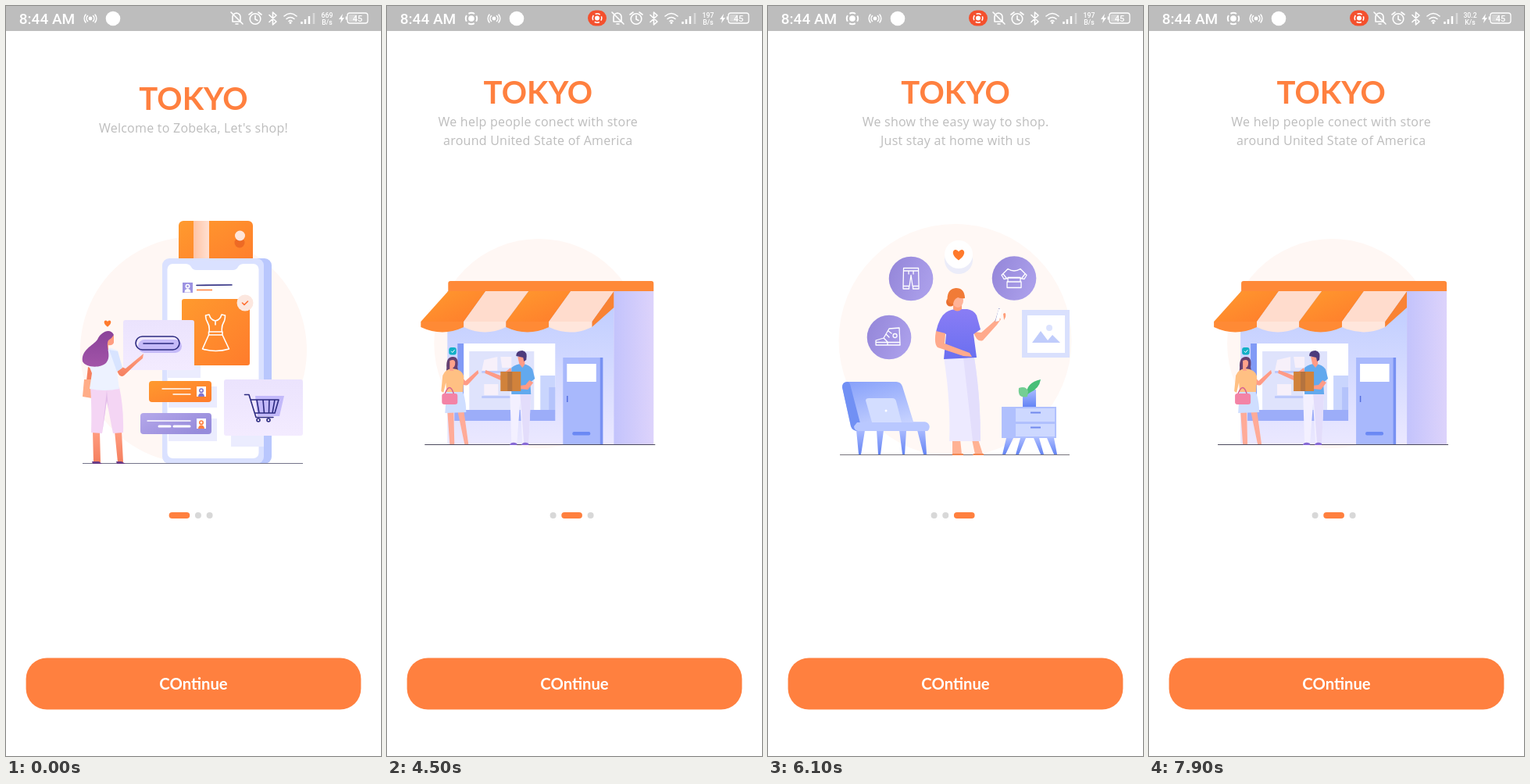
Animation of 480 by 960 pixels, one loop 8 s. Source, as an HTML page:

```html
<!DOCTYPE html>
<html lang="en">
<head>
<meta charset="utf-8">
<title>Shop onboarding</title>
<style>
  html, body { margin: 0; height: 100%; overflow: hidden; background: #fff; }
  svg { display: block; width: 100vw; height: 100vh; }
  text { font-family: "Open Sans", sans-serif; text-anchor: middle; }
  .title, .label { font-family: Lato, sans-serif; font-weight: 700; }
  .title { font-size: 40px; fill: #ff803f; }
  .label { font-size: 20.3px; fill: #fff; }
  .sub { font-size: 16px; letter-spacing: .25px; fill: #bdbdbd; }
  .bar text { font-family: Roboto, sans-serif; font-weight: 500; fill: #fff; }
  .speed text { font-size: 8.7px; }
  .line { fill: none; stroke: #fff; stroke-width: 1.6; stroke-linecap: round; stroke-linejoin: round; }
  .thin { stroke-width: 1.3; }
  .ink { stroke: #2d2b80; }
</style>
</head>
<body>
<svg viewBox="0 0 480 960" preserveAspectRatio="none">
  <defs>
    <linearGradient id="orange" x2="1" y2="1"><stop stop-color="#ff9a2e"/><stop offset="1" stop-color="#ff7c2c"/></linearGradient>
    <linearGradient id="purple" x2="1" y2=".6"><stop stop-color="#b5a8ea"/><stop offset="1" stop-color="#968bdb"/></linearGradient>
    <linearGradient id="badge" x2="1" y2=".4"><stop stop-color="#9385d8"/><stop offset="1" stop-color="#aa9eea"/></linearGradient>
    <linearGradient id="lilac" x2="0" y2="1"><stop stop-color="#ebe3fd"/><stop offset="1" stop-color="#f3ebff"/></linearGradient>
    <linearGradient id="blue" x2=".5" y2="1"><stop stop-color="#86a0fa"/><stop offset="1" stop-color="#c9d4ff"/></linearGradient>
    <linearGradient id="leg" x2="0" y2="1"><stop stop-color="#a9baff"/><stop offset="1" stop-color="#6484f4"/></linearGradient>
    <linearGradient id="wall" x2="0" y2="1"><stop stop-color="#bccbff"/><stop offset="1" stop-color="#ebe8ff"/></linearGradient>
    <linearGradient id="side" x2="1" y2="0"><stop stop-color="#c3c3fc"/><stop offset="1" stop-color="#ddd3fb"/></linearGradient>
    <linearGradient id="hair" x2="0" y2="1"><stop stop-color="#8a4399"/><stop offset="1" stop-color="#a254a8"/></linearGradient>
    <linearGradient id="skin" x2="0" y2="1"><stop stop-color="#ff9d80"/><stop offset="1" stop-color="#f5805f"/></linearGradient>
    <linearGradient id="top" x2="0" y2="1"><stop stop-color="#8a7df5"/><stop offset="1" stop-color="#6a6ff0"/></linearGradient>
    <linearGradient id="stripe" x2="1" y2="0"><stop stop-color="#ffc4a4"/><stop offset="1" stop-color="#ffe0d3"/></linearGradient>
    <clipPath id="view"><path d="M0 32H480V589H0z"/></clipPath>
    <g id="person"><circle cx="6" cy="4.2" r="2.2" fill="none" stroke-width="1.6"/><path d="M2 12a4 4.5 0 0 1 8 0z" stroke="none" fill="context-stroke"/></g>
    <path id="heart" d="M0 7C-11-1-7-7-3.500-6.500Q-1-6 0-4Q1-6 3.500-6.500C7-7 11-1 0 7z" fill="#ff7a2c"/>
    <g id="cast" class="line"><circle r="1.6" fill="#fff"/><path d="M-3.500-3.500a5 5 0 0 0 0 7M3.500-3.500a5 5 0 0 1 0 7M-6-5a8 8 0 0 0 0 10M6-5a8 8 0 0 1 0 10"/></g>
    <g id="record" fill="none" stroke="#fff"><circle r="3.800" fill="#fff" stroke="none"/><circle r="7.200" stroke-width="2" stroke-dasharray="8 3.310" stroke-dashoffset="4"/></g>
  </defs>

  <g class="page">
    <text class="title" x="240" y="133">TOKYO</text>
    <text class="sub" x="240" y="162">Welcome to Zobeka, Let's shop!</text>
    <path d="M230 585A145 145 0 1 1 250 585z" fill="#fff7f4"/>
    <rect x="221" y="275" width="95" height="60" rx="6" fill="url(#orange)"/>
    <path d="M240 275h20v50h-20z" fill="url(#stripe)"/>
    <circle cx="299" cy="303" r="6.500" fill="#ee6a24"/><circle cx="299.500" cy="294" r="6.500" fill="#ffe5da"/>
    <rect x="220" y="323" width="120" height="263" rx="9" fill="#b9c7fd"/>
    <rect x="200" y="323" width="130" height="263" rx="9" fill="#dae1ff"/>
    <rect x="206.500" y="330" width="117" height="249" rx="7" fill="#fff"/>
    <path d="M229 330q6 0 8 4q2 4 7 4h46q5 0 7-4q2-4 8-4z" fill="#dae1ff"/>
    <path d="M226 354h13v13h-13z" fill="#9d93e2"/><use href="#person" x="226.500" y="354.500" stroke="#fff"/>
    <path class="line ink" d="M244 357.500L289 357"/><path d="M244 363.500h20" stroke="#ff803f" stroke-width="1.500"/>
    <path d="M207 414h42v62h-42zM238 487h32v27h-62v-10zM238 528h32v29h-62v-12zM288 488h42v76h-42z" fill="#ebecfe"/>
    <rect x="225" y="375" width="87" height="85" rx="3" fill="url(#orange)"/>
    <circle cx="306" cy="380" r="10.500" fill="#fce7df"/><path class="line" style="stroke:#ff7030" d="M302.500 380l2.500 2.500 4.500-4.500"/>
    <path class="line" d="M255.500 396l4.500-1q2 7 8 8q6-1 8-8l4.500 1q0 6-2 9q-3 5-2 12h-16.500q1-7-2-12q-2.500-4-2.500-9zM268 403v5M259.500 417v4h17.500v-4M259.500 421L251.500 439q17 5 34 0L277 421"/>
    <rect x="150" y="402" width="91" height="64" rx="3" fill="url(#lilac)"/>
    <rect x="169" y="427" width="56" height="17" rx="8.500" fill="#c5baf8"/>
    <rect class="line ink" x="166" y="423" width="56" height="17" rx="8.500"/><path class="line ink" d="M176 432h38"/>
    <rect x="183" y="480" width="80" height="27" rx="4" fill="url(#orange)"/>
    <rect x="172" y="521" width="91" height="27" rx="4" fill="url(#purple)"/>
    <path class="line thin" d="M200 490h36M214 497h22M181 531h55"/><path class="line" style="stroke-width:3" d="M196 538h14M215 538h20"/>
    <path d="M244 487h12v13h-12zM244 528h12v13h-12z" fill="#fff"/>
    <use href="#person" x="244" y="488" stroke="#8075cf"/><use href="#person" x="244" y="529" stroke="#ff803f"/>
    <rect x="279" y="478" width="101" height="72" rx="3" fill="url(#lilac)"/>
    <path d="M319 499h37l-6 26h-28z" fill="#c3b9fa"/>
    <path class="line ink" d="M305.500 497.500h5.500l9 29h22M313 504h36l-5 17h-25M321 504l3 17M329 504l1.500 17M337 504l-.5 17M344 504l-3 17"/>
    <g class="line ink"><circle cx="323" cy="530" r="2"/><circle cx="336" cy="530" r="2"/></g>
    <path d="M98 585.500h282" stroke="#75758a"/>
    <use href="#heart" transform="translate(130 406.500) scale(.6)"/>
    <path d="M105 462L103 480l6 1 3-16z" fill="#f5805f"/><path d="M100 478h9l1 24-12-2z" fill="#ffad88"/>
    <path d="M111 544h9l1 40h-9zM139 544h9l2 40h-7z" fill="url(#skin)"/>
    <path d="M110 583h9l4 3h-12zM141 583h7l5 3h-11z" fill="#6a3c86"/>
    <path d="M108 488L145 488Q151 515 150 546L137 547L129 505L123 547L109 546Q110 515 108 488z" fill="#f4d5f4"/>
    <path d="M129 492L131 515L137 547L129 505L123 547z" fill="#e3bdea"/>
    <path d="M141 465l7-3l5 2 17-14 6-5-1 6-6 5-18 17q-5 3-8-4z" fill="url(#skin)"/>
    <path d="M106 460Q114 438 135 438L143 441 149 463 142 468 145 490Q126 494 107 490L110 470z" fill="#edf2ff"/>
    <path d="M132 440l11 2 6 21-7 5z" fill="#d8e4ff"/>
    <path d="M129 424q3-8 9-2v9q-2 4-7 3v6h-6z" fill="#ff9d80"/>
    <path d="M138 421C134 412 122 416 117 427C111 435 96 440 98 455C102 463 121 464 128 457C136 448 127 436 131 428Q135 426 138 421z" fill="url(#hair)"/>
  </g>

  <g class="page">
    <text class="title" x="240" y="125">TOKYO</text>
    <text class="sub" x="240" y="154">We help people conect with store</text>
    <text class="sub" x="240" y="178">around United State of America</text>
    <g id="store" transform="translate(7)">
      <circle cx="234" cy="432" r="134" fill="#fff7f4"/>
      <path d="M117 365h213v196h-213z" fill="url(#wall)"/><path d="M330 365h51v196h-51z" fill="url(#side)"/>
      <path d="M118 365v-10q0-3 3-3h257q3 0 3 3v10z" fill="#ff8938"/>
      <path d="M302 404L330 365v21l-28 25z" fill="#f98334"/>
      <g id="awning"></g>
      <path d="M130 432h8v99h-8z" fill="#819af6"/><path d="M138 432h117v85h-117z" fill="#fff"/>
      <path d="M126 517h129v14h-129z" fill="#9cadf9"/><path d="M145 442h83v75h-83z" fill="#dfe3fc"/>
      <path d="M164 453l17-4v18h-20zM185 449h14v14h-12zM164 484h18v14h-18z" fill="#f7f0fa"/>
      <path d="M161 467h38v3h-38zM161 499h38v3h-38z" fill="#bdc9fb"/>
      <path d="M236 473h19v44h-19z" fill="#c9d5fd"/><path d="M247 488h8v29h-8z" fill="#b4c3fb"/>
      <path d="M265 450h51v111h-51z" fill="#a8b8fc"/><path d="M312.500 450h3.500v111h-3.500z" fill="#7891f2"/>
      <path d="M270 458h37.500v23h-37.500z" fill="#fff"/><path d="M270.500 499v8" stroke="#566fdf" stroke-width="1.500"/>
      <rect x="277" y="545" width="23" height="4.500" rx="2" fill="#6b89f4"/>
      <path d="M88 561.500h295" stroke="#4c4a5d"/>
      <rect x="119" y="437" width="9.500" height="9.500" rx="3" fill="#12b0c6"/><path class="line" style="stroke-width:1" d="M122 442l1.500 1.500 2.500-3"/>
      <path d="M116 463q-1-14 8-14q8 0 6 13l2 12h-17z" fill="#654071"/>
      <path d="M117 518h8l1 43h-6zM130 518h8l6 43h-5z" fill="#ffab98"/>
      <path d="M116 492h20q5 12 5 28l-27 1z" fill="#cfdeff"/>
      <path d="M135 474l5 6 16-14 1 4-14 15q-5 2-8-3z" fill="#ff9b86"/>
      <path d="M111 473q3-8 12-9q13 1 15 10l-1 20h-21l-1-12-3 13-3-2z" fill="#ffc083"/>
      <path d="M120 454q6-3 7 2q0 6-3 7l1 4h-5z" fill="#ffa28a"/>
      <path class="line" style="stroke:#d9638f" d="M114 496q6-15 11 0"/><rect x="110" y="496" width="20" height="14" rx="3" fill="#f383a6"/>
      <path d="M197 494h27l-3 66h-8l-3-52-4 52h-7z" fill="#f3f0ff"/><path d="M210 496h14l-3 64h-6z" fill="#e3ddfb"/>
      <path d="M197 561q3-4 9-1v2h-9zM212 561q3-4 9-1v2h-9z" fill="#8669d5"/>
      <path d="M200 470l-15 9-20-9 1-4 19 7 13-10z" fill="#ff9b86"/>
      <path d="M199 463q6-5 14-5q9 1 13 7l3 12-6 5 1 15h-25z" fill="#62a9ee"/>
      <path d="M222 479l5 3-7 9-12-1 1-4 8-1z" fill="#ff9b86"/>
      <path d="M185 468h26v25h-26z" fill="#d1823b"/><path d="M194 468h6v25h-6z" fill="#b4733f"/>
      <path d="M207 449h9v10l-3 4-4-5z" fill="#ff9b86"/><path d="M205 448q0-7 8-7q7 1 5 12l-3 2-1-5z" fill="#4c3b7c"/>
    </g>
  </g>

  <g class="page">
    <text class="title" x="240" y="125">TOKYO</text>
    <text class="sub" x="240" y="154">We show the easy way to shop.</text>
    <text class="sub" x="240" y="178">Just stay at home with us</text>
    <g id="home" transform="translate(-2)">
      <circle cx="241.500" cy="428" r="149" fill="#fff8f5"/>
      <circle cx="246" cy="325" r="18" fill="#ebecf9"/><circle cx="246" cy="318" r="18" fill="#fff"/>
      <use href="#heart" x="246" y="318.500"/>
      <g fill="url(#badge)"><circle cx="185" cy="349" r="28.300"/><circle cx="317" cy="348.500" r="28.300"/><circle cx="157" cy="424" r="28.300"/></g>
      <path class="line thin" d="M175.500 335.500h19l.5 23h-8l-2-14-2 14h-8zM175.500 339h19M175 358.500v3.500h7.500v-3.500M187.500 358.500v3.500h7.500v-3.500M182 339v4M188 339v4"/>
      <path class="line thin" d="M309 336.500q8 5 16 0l8 8-3 5-5-1v-1h-16v1l-5 1-3-5zM309 348h16v5h-16zM308 353h18v7.500h-18zM303 343l4 5M331 343l-4 5"/>
      <path class="line thin" d="M157 413l13-1 1 22h-31v-6l10-3zM140 430.500h31M150 425l5 5M153 420l4 4M156 416l4 3M155 434v-3"/><circle class="line thin" cx="164.500" cy="422" r="2.500"/>
      <path d="M327 389h61v61h-61z" fill="#d9e0fd"/><path d="M334 396h48v48h-48z" fill="#fff"/>
      <path d="M340 431l11-15 9 12 6-7 10 10z" fill="#c0ccfb"/><circle cx="362" cy="412" r="4" fill="#dce3fe"/>
      <path d="M94 574.500h294" stroke="#77747c"/>
      <path d="M115 543h11l-5 31h-3zM141 543h9l-4 31h-3zM170 543h9l-2 31h-3zM193 543h10l2 31h-4z" fill="url(#leg)"/>
      <path d="M97 488Q97 481 104 481H166Q172 481 174 487L188 532H203Q210 535 208 541L206 544H117Q110 544 108 538z" fill="url(#blue)"/>
      <path d="M97 488Q97 481 104 481Q107 482 108 488L120 534 118 544Q110 544 108 538z" fill="#7190f4"/>
      <path d="M116 533h89q5 3 3 9l-2 2h-89q-5-1-5-6z" fill="#b9c8ff"/>
      <path d="M127 505q0-3 4-3h30q4 0 5 4l7 27h-38z" fill="#d3ddff"/><circle cx="153" cy="518" r="1.500" fill="#fff"/>
      <path d="M307 553h9l-10 21h-4zM325 553h7l-9 21h-4zM342 553h7l6 21h-4zM359 553h9l4 21h-4z" fill="url(#leg)"/>
      <path d="M301 513h70v40h-70z" fill="#b0c0fd"/><path d="M319 515h50v17h-50zM319 535h50v16h-50z" fill="#cdd8ff"/>
      <path d="M338 520.500h13M338 539.500h13" stroke="#7189ed" stroke-width="2"/>
      <path d="M328 491h17v22h-17z" fill="url(#leg)"/>
      <path d="M333 498q-1-16 18-20q-2 12-14 17z" fill="#48bf78"/><path d="M334 500q-13 3-11-11q9-3 12 4z" fill="#74ce93"/>
      <path d="M238 555h10l2 19h-12zM263 555h8l6 19h-10z" fill="#ffb294"/><path d="M238 573h14v2h-14zM265 573h13v2h-14z" fill="#f28650"/>
      <path d="M227 450h39q8 50 8 107h-40q2-50-7-107z" fill="#edeaff"/><path d="M252 450h14q8 50 8 107h-10z" fill="#e3defc"/>
      <path d="M265 417l10 1 17-15 5-6 3 4-5 7-18 20q-8 3-12-11z" fill="#ffaa8c"/>
      <path d="M293 404l5-17" stroke="#6f72bb"/><path d="M297 388l4 0-3 15-5 1z" fill="#fff"/><path d="M303 394q4-3 3 4l-2 4z" fill="#ff9d78"/>
      <path d="M230 392q6-4 14-4h13q8 1 12 8l5 18-9 6 4 30-42 2 3-32-13-3q4-19 13-25z" fill="url(#top)"/>
      <path d="M217 416l12 3-1 13 32 12 3 5-11-1-33-11q-5-5-2-21z" fill="#ffaa8c"/>
      <circle cx="235.500" cy="379" r="5.500" fill="#e96f30"/>
      <path d="M239 380h11v8q-6 5-11 0z" fill="#ff9d78"/><ellipse cx="245" cy="377" rx="7" ry="9" fill="#ffb398"/>
      <path d="M231.500 375q0-13 11-14q11 0 11.500 13q-5 1-9-1q-5 2-6 8q-6 1-7.500-6z" fill="#f17b37"/>
    </g>
  </g>

  <g clip-path="url(#view)"><circle id="glow" cy="425" r="3350" fill="#2196f3"/></g>
  <g id="dots"></g>
  <rect x="25.600" y="834.500" width="428.800" height="66" rx="26.700" fill="#ff803f"/>
  <text class="label" x="240" y="875">COntinue</text>

  <g class="bar">
    <path d="M0 0H480V32H0z" fill="#bdbdbd"/>
    <text x="52.500" y="23" font-size="19">8:44 AM</text>
    <g id="notices"><use href="#cast" x="108" y="16"/><circle cx="137" cy="16" r="9.300" fill="#fff"/></g>
    <g id="recording">
      <use href="#record" x="108" y="16"/>
      <rect x="257" y="5.500" width="24" height="20" rx="10" fill="#f4502d"/>
      <use href="#record" transform="translate(269 15.500) scale(.8)"/>
    </g>
    <g class="line">
      <path d="M290 20h10v-6q0-4-5-5q-5 1-5 5zM294 23h3M288 8l15 15"/>
      <circle cx="319" cy="16.500" r="6.800"/><path d="M319 12.500v4.500l3 1.500M311 11l4-3M327 11l-4-3"/>
      <path d="M337 11.500l9 8.500-4.500 4V8l4.500 4-9 8.500"/>
      <path d="M356 13q8-7 16 0M359 16.500q5-4 10 0M362 19.500q2-2 4 0"/><circle cx="364" cy="21.500" r=".7"/>
      <path style="stroke-width:2.500;stroke-linecap:butt" d="M378.500 23v-3M383 23v-6M388 23v-10"/><path style="stroke-width:2.500;stroke-linecap:butt" opacity=".4" d="M394 23v-14"/>
      <rect class="thin" x="437" y="9" width="26" height="13" rx="3"/><path d="M435.500 14v3"/>
    </g>
    <path d="M431 10l-5 7h3l-1 5 5-7h-3z" fill="#fff"/><path d="M439 11h10v9h-10z" fill="#fff" opacity=".3"/>
    <g class="speed"><text id="rate" x="411" y="14.500"></text><text id="unit" x="411" y="23.500"></text></g>
    <text x="450" y="19.500" font-size="11">45</text>
  </g>
</svg>
<script>
const $ = id => document.getElementById(id);
const LOOP = 8000, ACCENT = '#ff803f', GREY = '#d8d8d8';
const FIRST_SWIPE = 2800, SECOND_SWIPE = 4250, BACK_SWIPE = 7050, IMAGE_DELAY = 320;
const ramp = (t, from, to) => Math.min(1, Math.max(0, (t - from) / (to - from)));
const show = (id, visible) => { $(id).style.display = visible ? '' : 'none'; };
const pages = [...document.querySelectorAll('.page')];

// Awning stripes: a slanted panel with a scalloped hem.
const upper = [118, 166, 221, 275, 330], lower = [83, 138, 192, 247, 302];
$('awning').innerHTML = [0, 1, 2, 3].map(i => {
  const l = lower[i], r = lower[i + 1];
  const hem = `M${l} 404H${r}V411Q${(l + r) / 2} 424 ${l} 411z`;
  const [fill, dark] = i % 2 ? ['#ffdccd', '#ffe6dc'] : ['url(#orange)', '#ff8a35'];
  return `<path d="M${upper[i]} 365H${upper[i + 1]}L${r} 404H${l}z" fill="${fill}"/><path d="${hem}" fill="${dark}"/>`;
}).join('');

$('dots').innerHTML = '<rect y="648" height="8" rx="4"/>'.repeat(3);
const dots = [...$('dots').children];

// Finger drag up to `reach`, then an exponential settle onto the next page.
function swipe(t, start, release, reach, power, tau) {
  if (t < release) return reach * ramp(t, start, release) ** power;
  return 1 - (1 - reach) * Math.exp((release - t) / tau);
}

function draw(t) {
  const scroll = swipe(t, FIRST_SWIPE, 3150, .65, .72, 120)
    + swipe(t, SECOND_SWIPE, 4900, .55, 1.82, 142)
    - swipe(t, BACK_SWIPE, 7450, .55, 2.35, 131);
  pages.forEach((page, i) => page.setAttribute('transform', `translate(${(i - scroll) * 480})`));

  // Pictures decode a moment after their page first scrolls into view.
  show('store', t >= FIRST_SWIPE + IMAGE_DELAY);
  show('home', t >= SECOND_SWIPE + IMAGE_DELAY);

  const active = ramp(t, 3043, 3243) + ramp(t, 4866, 5066) - ramp(t, 7434, 7634);
  let x = 208.6;
  dots.forEach((dot, i) => {
    const on = Math.max(0, 1 - Math.abs(active - i)), width = 8 + 18.67 * on;
    dot.setAttribute('x', x);
    dot.setAttribute('width', width);
    dot.style.fill = `color-mix(in srgb, ${ACCENT} ${on * 100}%, ${GREY})`;
    x += width + 6.67;
  });

  const pull = ramp(t, 6780, 7080) * (1 - ramp(t, 7120, 7520));
  $('glow').setAttribute('cx', 3350 + 480 - 27 * pull);
  $('glow').setAttribute('opacity', .15 * pull);

  const recording = t >= 400;
  show('recording', recording);
  $('notices').setAttribute('transform', `translate(${recording ? 29 : 0})`);
  $('rate').textContent = t < 2500 ? '669' : t < 7000 ? '197' : '30.2';
  $('unit').textContent = t < 7000 ? 'B/s' : 'K/s';
}

function frame() {
  draw(performance.now() % LOOP);
  requestAnimationFrame(frame);
}
frame();
</script>
</body>
</html>
```
